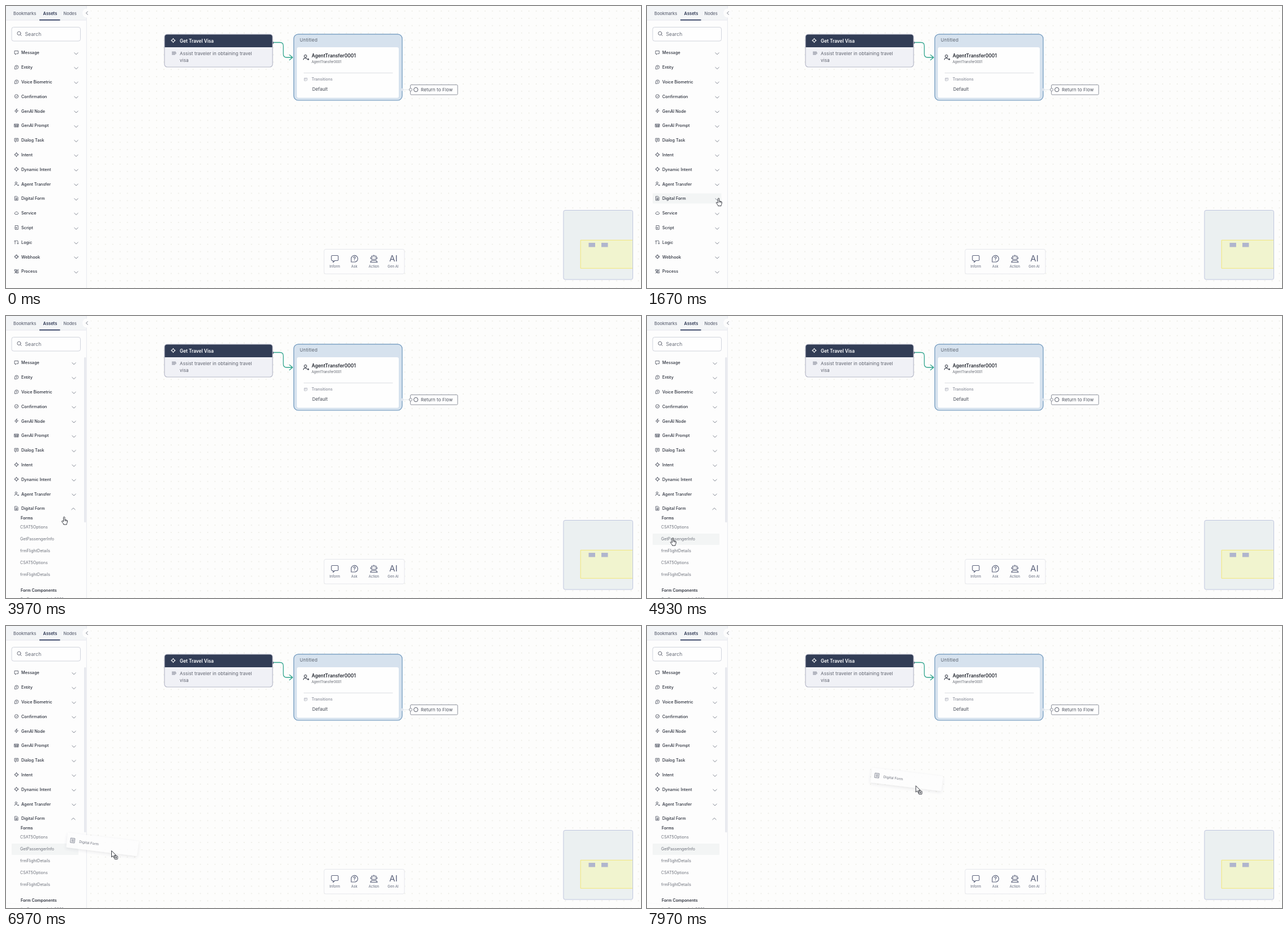
These frames come from a looping animation (1122x499 px, 8 s). An HTML page:

```html
<!DOCTYPE html>
<html lang="en">
<head>
<meta charset="utf-8">
<title>Flow builder</title>
<style>
html, body { margin: 0; width: 100%; height: 100%; overflow: hidden; background: #fdfdfc; }
svg { display: block; width: 1122px; height: 499px; font-family: Inter, "Noto Sans", sans-serif; }
text { white-space: pre; }
.line { fill: none; stroke: #444a59; stroke-width: .8; stroke-linecap: round; stroke-linejoin: round; }
.tool { fill: none; stroke: #5c637c; stroke-width: 1.15; stroke-linecap: round; stroke-linejoin: round; }
</style>
</head>
<body>
<svg id="stage" viewBox="0 0 1122 499"></svg>
<script>
const LOOP = 8000;
const PITCH = 25.8, FIRST = 82.7, OPEN = 10, LIST_TOP = 73, FOLD_TOP = 350, FOLD = 200;

const bubble = 'M-3-3H3V2H0L-2 3.6V2H-3Z';
const ask = 'M-3 3.2V0A3.2 3.2 0 1 1 0 3.2ZM-1-.9Q0-2 1-.9Q1 0 0 .4M0 1.6V1.7';
const target = 'M2.6 0A2.6 2.6 0 1 1-2.6 0A2.6 2.6 0 1 1 2.6 0M0-3.7V-2M0 2V3.7M-3.7 0H-2M2 0H3.7';
const page = 'M-2.6-3.5H1L2.6-1.9V3.5H-2.6ZM-1.2-.6H1.2M-1.2.8H1.2M-1.2 2.1H.6';
const person = 'M1-1.7A1.7 1.7 0 1 1-2.4-1.7A1.7 1.7 0 1 1 1-1.7M-3.5 3Q-3.3.9-.7.9Q.7.9 1.2 1.6M1.5 2.5H3.8M2.9 1.5L3.9 2.5L2.9 3.5';

const rows = [
  ['Message', bubble],
  ['Entity', ask],
  ['Voice Biometric', ask],
  ['Confirmation', 'M3.2 0A3.2 3.2 0 1 1-3.2 0A3.2 3.2 0 1 1 3.2 0M-1.4 0L-.4 1L1.5-1'],
  ['GenAI Node', 'M.5-3.5L-3 .6H-.3L-.6 3.5L3-.6H.2Z'],
  ['GenAI Prompt', 'M-3.5-2.6H3.5V2.6H-3.5ZM-3.5-.9H3.5M-2 1H2M-1.7-1V2.4M1.7-1V2.4'],
  ['Dialog Task', 'M-3-3H3V2H0L-2 3.6V2H-3ZM-1.5-1.3H1.5M-1.5.2H.8'],
  ['Intent', target],
  ['Dynamic Intent', target],
  ['Agent Transfer', person],
  ['Digital Form', page],
  ['Service', 'M-2 2.4A1.7 1.7 0 0 1-2-.9A2.2 2.2 0 0 1 2-.9A1.7 1.7 0 0 1 2 2.4Z'],
  ['Script', 'M-2.4-1V-3.4H2.8V3.4H-2.4V2.4M-3.6.7H.4M-.8-.6L.5.7L-.8 2'],
  ['Logic', 'M-2.5 3.2V-2.6M-3.6-1.5L-2.5-2.7L-1.4-1.5M-.4-2.6H1.4Q2.5-2.6 2.5-1V3.2M1.4 2.1L2.5 3.2L3.6 2.1'],
  ['Webhook', 'M2.4 0A2.4 2.4 0 1 1-2.4 0A2.4 2.4 0 1 1 2.4 0M-1-3H1M-1 3H1M-3-1V1M3-1V1'],
  ['Process', 'M-3-3H0V-.6H-3ZM.4 1H3.2V3.2H.4ZM-2 .6V2.4H-.6M1.4-2H2.8V-.2M-3.4 3.4L3.4-3.4']
];
const forms = [
  ['CSAT5Options', 373.6], ['GetPassengerInfo', 394.2], ['frmFlightDetails', 415.1],
  ['CSAT5Options', 436], ['frmFlightDetails', 457], ['GetPassengerInfo0001', 501]
];

// y is the vertical middle of the text
const text = (x, y, size, str, fill, weight = 400, extra = '') =>
  `<text x="${x}" y="${y + size * .36}" font-size="${size}" fill="${fill}" font-weight="${weight}" ${extra}>${str}</text>`;
const rect = (x, y, w, h, r, fill, stroke = 'none', extra = '') =>
  `<rect x="${x}" y="${y}" width="${w}" height="${h}" rx="${r}" fill="${fill}" stroke="${stroke}" ${extra}/>`;
const icon = (x, y, d, cls = 'line', extra = '') =>
  `<path class="${cls}" transform="translate(${x} ${y})" d="${d}" ${extra}/>`;

const row = ([name, d], i) => {
  const y = FIRST + i * PITCH;
  return icon(18.5, y - .3, d) + text(27, y + .1, 7.3, name, '#2b303c', 500) +
    `<path class="line chev" data-i="${i}" style="stroke:#666c7a"/>`;
};

const defs = `<defs>
  <pattern id="dots" x="144" y="3" width="12.9" height="12.9" patternUnits="userSpaceOnUse">
    <circle cx="6" cy="6" r="1" fill="#ebebe4"/></pattern>
  <clipPath id="list"><rect y="${LIST_TOP}" width="142" height="430"/></clipPath>
  <clipPath id="foldClip"><rect id="fold" y="${FOLD_TOP}" width="142" height="0"/></clipPath>
  <filter id="soft" x="-20%" y="-50%" width="140%" height="220%">
    <feDropShadow dx="0" dy="2" stdDeviation="2.5" flood-color="#50546a" flood-opacity=".14"/></filter>
</defs>`;

const canvas = rect(0, 0, 1122, 499, 0, '#fdfdfc') + rect(142, 0, 980, 499, 0, 'url(#dots)');

const visaCard = rect(280, 50, 191, 58, 5, '#f0f1f6', '#b7b9c9', 'stroke-width="1.2"') +
  '<path d="M280.5 73V55Q280.5 50.5 285 50.5H466Q470.5 50.5 470.5 55V73Z" fill="#323d56"/>' +
  icon(295.5, 61, target, 'line', 'style="stroke:#fff;stroke-width:1"') +
  text(307, 61.6, 8.25, 'Get Travel Visa', '#fff', 600) +
  icon(297, 83.5, 'M-3.5-2.4H2.5M-3.5-.8H3.5M-3.5.8H3.5M-3.5 2.4H1.5', 'line', 'style="stroke:#777c8c"') +
  text(307, 83.8, 8, 'Assist traveler in obtaining travel', '#5b5f6b', 400, 'letter-spacing=".13"') +
  text(307, 96.1, 8, 'visa', '#5b5f6b', 400, 'letter-spacing=".13"');

const link = '<path d="M471 64.5H484Q490 64.5 490 70.5V85Q490 91 496 91H506M501 86.5L506.5 91L501 95.5" fill="none" stroke="#2fa48c" stroke-width="1.3" stroke-linecap="round" stroke-linejoin="round"/>' +
  '<circle cx="471" cy="65" r="2.2" fill="#59617a"/>';

const agentCard = rect(508.5, 49.8, 191.5, 117.2, 8, '#d6e2ee', '#6c96bd', 'stroke-width="1.2"') +
  text(519, 60.4, 8.1, 'Untitled', '#5c6470', 400, 'letter-spacing=".2"') +
  rect(514, 73, 180, 89.5, 3, '#fefefe') +
  icon(530, 91, person, 'line', 'style="stroke:#333845;transform:translate(530px,91px) scale(1.3)"') +
  text(540, 87.8, 8.35, 'AgentTransfer0001', '#22262f', 600) +
  text(540, 99.3, 5.85, 'AgentTransfer0001', '#5f636d') +
  rect(526, 118, 157.5, .9, 0, '#d9dbe0') +
  icon(529.5, 129.8, 'M-2-2.2H2.6V1.4L1 2.4H-2ZM-2-.6H1', 'line', 'style="stroke:#a9adb9"') +
  text(540, 129.7, 6.9, 'Transitions', '#9599a4', 600) +
  text(541, 147.5, 8.1, 'Default', '#444954') +
  '<path d="M700 148H715" stroke="#dfe3e8"/><circle cx="700" cy="148" r="2.4" fill="#dbe4ee"/>';

const returnBox = rect(714.5, 139.5, 83.5, 17.5, 1.5, '#fefefe', '#8e929d') +
  '<circle cx="715" cy="148" r="2.5" fill="#fff" stroke="#8e929d"/><circle cx="724.2" cy="148" r="3.7" fill="none" stroke="#555a67"/>' +
  text(733, 148, 8, 'Return to Flow', '#4b505c', 400, 'letter-spacing=".13"');

const mini = rect(985, 361.5, 122.5, 122.5, 3, '#ebf0f1') +
  rect(1015, 414.3, 92.5, 49.9, 0, '#f1f4cf') +
  '<path d="M1107.5 414.3H1015.2V464.2H1107.5" fill="none" stroke="#f2e678"/>' +
  rect(985, 361.5, 122.5, 122.5, 3, 'none', '#b9c1dc', 'stroke-width=".9"') +
  rect(1029.5, 419, 11.5, 7.5, 0, '#b0b5cd') + rect(1052, 419, 11.5, 7.5, 0, '#b0b5cd');

const label = (x, str) => text(x, 460.8, 6.1, str, '#5c6376', 400, 'text-anchor="middle"');
const toolbar = rect(562, 430.5, 142, 43.5, 3, '#fdfdfd', '#e6e7ec') +
  icon(581, 447, 'M-4.5-5.5H4.5Q6-5.5 6-4V2Q6 3.5 4.5 3.5H0L-3 6.5V3.5H-4.5Q-6 3.5-6 2V-4Q-6-5.5-4.5-5.5Z', 'tool') +
  icon(615.5, 447, 'M-5.5 6V0A5.8 5.8 0 1 1 0 6ZM-1.7-1.6Q-1.4-3.2 0-3.2Q1.8-3.1 1.8-1.6Q1.7-.5 0 .3V1M0 2.9V3', 'tool') +
  icon(650, 447, 'M-4-4.5H4V1.5H-4ZM0-4.5V-6.5M-1.7-1.6V-1.4M1.7-1.6V-1.4M-5.7-2V0M5.7-2V0M-6 6.5Q-5.5 3.5-2.5 3.5H2.5Q5.5 3.5 6 6.5Z', 'tool') +
  text(684.5, 447, 15, 'AI', '#5c637c', 400, 'text-anchor="middle"') +
  label(581, 'Inform') + label(615.5, 'Ask') + label(650, 'Action') + label(684, 'Gen AI');

const sidebar = rect(0, 0, 142, 499, 0, '#fdfdfd') + rect(0, 0, 142, 25, 0, '#f3f5f7') +
  '<path d="M142.3 0V499M0 25H142" stroke="#e4e6ec" stroke-width=".9"/>' +
  '<circle cx="143" cy="12.5" r="8" fill="#fdfdfd"/>' +
  icon(143, 12.5, 'M1.3-2.7L-1.5 0L1.3 2.7', 'line', 'style="stroke:#555b6a"') +
  text(13, 13.2, 7.5, 'Bookmarks', '#616777', 500) + text(65.5, 13.2, 7.5, 'Assets', '#293350', 600) +
  text(101.5, 13.2, 7.5, 'Nodes', '#616777', 500) + rect(59, 23.8, 36.5, 1.8, 0, '#323f62') +
  rect(10, 37.5, 121.5, 24.5, 3.5, '#fefefe', '#d0d3dc') +
  icon(23.5, 49, 'M2.6-.6A3.1 3.1 0 1 1-3.6-.6A3.1 3.1 0 1 1 2.6-.6M1.8 1.7L3.8 3.7') +
  text(33.5, 49.6, 8.7, 'Search', '#686d79');

const list = `<g clip-path="url(#list)">
  <rect id="hover" x="10" rx="1" fill="#f3f5f5"/>
  ${rows.slice(0, OPEN + 1).map(row).join('')}
  <g clip-path="url(#foldClip)">
    ${text(26, 357.4, 7.1, 'Forms', '#30343f', 600)}
    ${forms.map(([name, y]) => text(25, y, 7.1, name, '#6c707a')).join('')}
    ${text(26, 485.4, 7.15, 'Form Components', '#30343f', 600)}
  </g>
  <g id="below">${rows.slice(OPEN + 1).map((r, i) => row(r, i + OPEN + 1)).join('')}</g>
  <rect id="thumb" x="138" y="${LIST_TOP}" width="3.6" rx="1.5" fill="#e7e9ee"/>
</g>`;

const chip = rect(0, 0, 126, 26, 2, '#fefefe', 'none', 'filter="url(#soft)" fill-opacity=".9"') +
  icon(10, 12.5, 'M-3.5-4H3.5V4H-3.5ZM-1.8-1.8H1.8M-1.8 0H1.8M-1.8 1.8H1.8', 'line', 'style="stroke:#737887"') +
  text(21.5, 13.2, 6.2, 'Digital Form', '#6a6e7a');

const arrow = '<path d="M0 0V11.4L2.7 9L4.5 13L6.3 12.2L4.6 8.3H8.2Z" fill="#fff" stroke="#22252d" stroke-width=".9" stroke-linejoin="round"/>';
const drag = `<g id="drag">
  <g opacity=".6" transform="translate(-87 480) rotate(7)">${rect(0, 0, 126, 26, 2, '#fefefe', 'none', 'filter="url(#soft)"')}</g>
  <g id="chip">${chip}</g></g>`;
const cursor = `<g id="cursor">
  <g id="arrow">${arrow}<g id="copy">${rect(5.2, 9.4, 5.6, 5.6, .8, '#fff', '#22252d', 'stroke-width=".9"')}
    <path d="M6.6 12.2H9.4M8 10.8V13.6" stroke="#22252d"/></g></g>
  <g id="hand"><path d="M-1.2 7.6V1.2A1.2 1.2 0 0 1 1.2 1.2V5L4.6 5.8Q6 6.2 5.8 7.6L5.3 10.6Q5.1 11.4 4.5 12V13.6H-1V12.5L-4 8.6Q-4.6 7.5-3.7 7.1Q-2.8 6.8-1.2 8.4Z" fill="#fff" stroke="#22252d" stroke-width=".9" stroke-linejoin="round"/>
    <path d="M1.2 5V7.6M2.9 5.6V7.8M4.5 6V8" stroke="#22252d" stroke-width=".7"/></g></g>`;

document.getElementById('stage').innerHTML = defs + canvas + link + visaCard + agentCard + returnBox +
  mini + toolbar + sidebar + list + drag + cursor;

const $ = id => document.getElementById(id);
const chevs = [...document.querySelectorAll('.chev')];

const inOut = u => u * u * (3 - 2 * u);
const easeIn = u => u * u;
const easeOut = u => u * (2 - u);
const linear = u => u;

// time, tip x, tip y, easing towards this point
const track = [
  [630, 309, 12], [970, 135, 253, easeOut],
  [1270, 135, 253], [1670, 126.5, 340.2, inOut], [2030, 126.5, 341],
  [2130, 126.5, 341], [2560, 123.5, 342, inOut],
  [3700, 123.5, 342], [4500, 45.6, 392.4, inOut],
  [4530, 45.6, 392.4], [4630, 45.4, 392],
  [4830, 45.4, 392], [4930, 45.6, 392.6],
  [6370, 45.6, 392.6], [6970, 185.7, 398, easeIn], [7170, 346, 327], [7270, 379, 345, easeOut],
  [7470, 379, 345], [7620, 400, 360, inOut], [7970, 475, 282.7, inOut]
];

function tip(t) {
  const i = track.findIndex(k => k[0] > t);
  if (i < 0) return track[track.length - 1].slice(1);
  if (i === 0) return track[0].slice(1);
  const [t0, x0, y0] = track[i - 1], [t1, x1, y1, ease = linear] = track[i];
  const u = ease((t - t0) / (t1 - t0));
  return [x0 + (x1 - x0) * u, y0 + (y1 - y0) * u];
}

const show = (el, on) => el.setAttribute('visibility', on ? 'inherit' : 'hidden');

function hovered(x, y, h) {
  if (x < 10 || x > 132) return null;
  if (h > 0 && y > FOLD_TOP) {
    const hit = forms.find(f => Math.abs(f[1] - y) < 10.4);
    return hit ? [hit[1] - 9.3, 20] : null;
  }
  const i = Math.round((y - FIRST) / PITCH);
  return [FIRST + i * PITCH - 9.2, 18];
}

function draw(t) {
  const [x, y] = tip(t);
  const dragging = t >= 6400;
  const h = FOLD * inOut(Math.min(1, Math.max(0, (t - 2540) / 250)));
  const narrow = h > 5;

  $('fold').setAttribute('height', h);
  $('below').setAttribute('transform', `translate(0 ${h})`);
  show($('thumb'), narrow);
  $('thumb').setAttribute('height', 426 * 426 / (421 + h));
  for (const c of chevs) {
    const i = +c.dataset.i, up = i === OPEN && h > 0;
    const cx = narrow ? (up ? 119 : 120) : 124, cy = FIRST + i * PITCH + 1;
    c.setAttribute('d', up ? `M${cx - 3.2} ${cy + 1}l3.2-3l3.2 3` : `M${cx - 3.2} ${cy - 1}l3.2 3l3.2-3`);
  }

  const spot = t < 630 ? null : dragging ? [forms[1][1] - 9.3, 20] : hovered(x, y, h);
  show($('hover'), spot);
  if (spot) {
    $('hover').setAttribute('y', spot[0]);
    $('hover').setAttribute('height', spot[1]);
    $('hover').setAttribute('width', narrow ? 118 : 121.5);
  }

  show($('cursor'), t >= 630);
  $('cursor').setAttribute('transform', `translate(${x} ${y})`);
  const pointing = !dragging && x <= 132;
  show($('hand'), pointing);
  show($('arrow'), !pointing);
  show($('copy'), dragging);
  show($('drag'), dragging);
  $('chip').setAttribute('transform', `translate(${x - 77} ${y - 31.7}) rotate(7)`);
}

const start = performance.now();
function frame(now) {
  draw(Math.max(0, now - start) % LOOP);
  requestAnimationFrame(frame);
}
draw(0);
requestAnimationFrame(frame);
</script>
</body>
</html>
```
